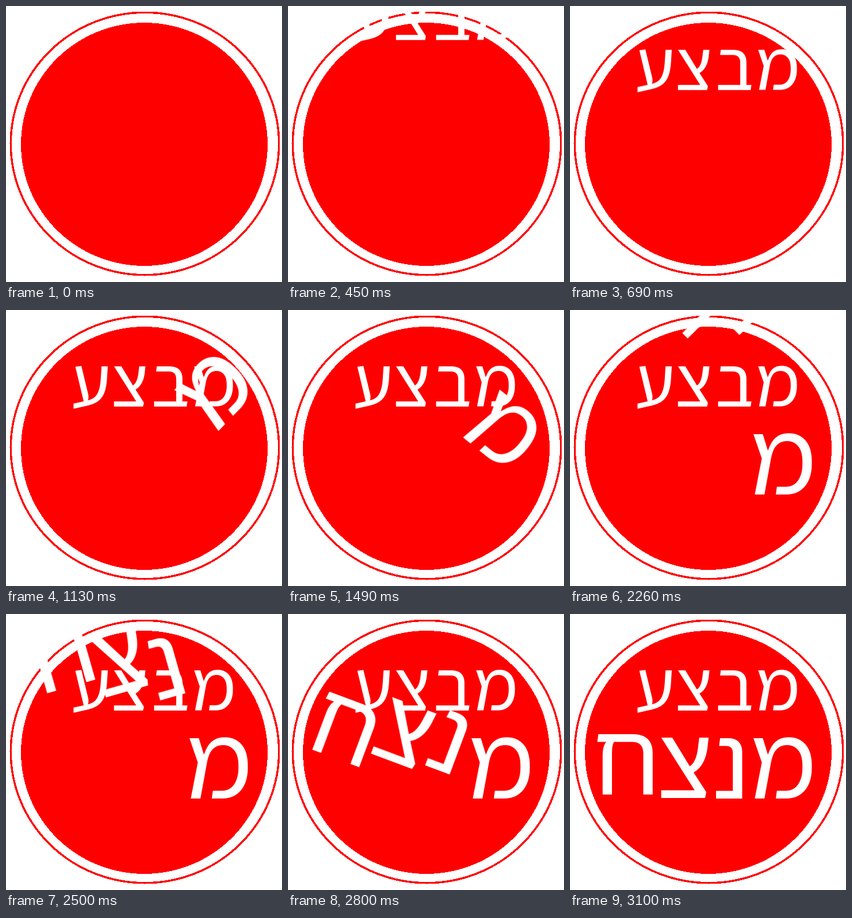
These frames come from a looping animation (480x480 px, 3.63 s). An HTML page:

```html
<!DOCTYPE html>
<html lang="he">
<head>
<meta charset="utf-8">
<title>מבצע מנצח</title>
<style>
  html, body { margin: 0; width: 100%; height: 100%; overflow: hidden; background: #fff; }
  svg { display: block; width: 100%; height: 100%; }
  text { fill: #fff; direction: ltr; }
  .slide { animation: slide 3630ms infinite; }
  .drop { animation: drop 3630ms infinite; }
  .tumble { animation: tumble 3630ms infinite; }

  @keyframes slide {
    0% { transform: translate(0, -174px); animation-timing-function: step-end; }
    9.0909% { transform: translate(0, -174px); animation-timing-function: steps(8, start); }
    22.314%, 100% { transform: translate(0, 0); }
  }
  @keyframes drop {
    0% { opacity: 0; transform: translate(-9px, -210px) rotate(-62deg); animation-timing-function: step-end; }
    27.8236% { opacity: 1; transform: translate(-9px, -210px) rotate(-62deg); animation-timing-function: steps(2); }
    31.1294% { opacity: 1; transform: translate(-5.5px, -129.5px) rotate(-46deg); animation-timing-function: steps(6); }
    41.0468% { opacity: 1; transform: translate(6px, -57.5px) rotate(38.7deg); animation-timing-function: steps(4); }
    47.6584%, 100% { opacity: 1; transform: translate(0, 0) rotate(0deg); }
  }
  @keyframes tumble {
    0% { opacity: 0; transform: translate(-4px, var(--high)) rotate(-45deg); animation-timing-function: step-end; }
    62.2589% { opacity: 1; transform: translate(-4px, var(--high)) rotate(-45deg); animation-timing-function: steps(9); }
    77.1349% { opacity: 1; transform: translate(2px, var(--low)) rotate(20.5deg); animation-timing-function: steps(5); }
    85.3994%, 100% { opacity: 1; transform: translate(0, 0) rotate(0deg); }
  }
</style>
</head>
<body>
<svg viewBox="0 0 480 480" role="img" aria-label="מבצע מנצח">
  <g shape-rendering="crispEdges">
    <ellipse cx="241.5" cy="239.5" rx="233.25" ry="228.25" fill="#fff" stroke="#f00" stroke-width="3.5"/>
    <ellipse cx="240.5" cy="240.5" rx="214.5" ry="211.5" fill="#f00"/>
  </g>
  <g id="top" class="slide"></g>
  <g id="bottom"></g>
</svg>
<script>
  // Each letter: left and right edge of its ink, baseline, motion
  const upper = [
    { ch: 'מ', l: 327, r: 395, base: 168 },
    { ch: 'ב', l: 253, r: 320, base: 168 },
    { ch: 'צ', l: 187, r: 243, base: 168 },
    { ch: 'ע', l: 115, r: 179, base: 168, tail: 6 }
  ];
  const lower = [
    { ch: 'מ', l: 320, r: 420, base: 321, move: 'drop' },
    { ch: 'נ', l: 250, r: 303, base: 321, move: 'tumble', high: -278, low: -47 },
    { ch: 'צ', l: 158, r: 241, base: 320, move: 'tumble', high: -284, low: -60 },
    { ch: 'ח', l: 48, r: 143, base: 314, move: 'tumble', high: -284, low: -61.5 }
  ];
  const upperHeight = 71, lowerHeight = 107;
  const families = ['Open Sans', 'Noto Sans Hebrew', 'Droid Sans Hebrew', 'Open Sans Hebrew',
    'Noto Sans', 'DejaVu Sans', 'Liberation Sans', 'Roboto', 'Lato', 'Inter'];
  const NS = 'http://www.w3.org/2000/svg';
  const ctx = document.createElement('canvas').getContext('2d');

  function ink(ch, family) {
    ctx.font = `200px "${family}", sans-serif`;
    ctx.textAlign = 'left';
    const m = ctx.measureText(ch);
    return {
      l: -m.actualBoundingBoxLeft / 200,
      r: m.actualBoundingBoxRight / 200,
      up: m.actualBoundingBoxAscent / 200,
      down: m.actualBoundingBoxDescent / 200
    };
  }

  const sizeFor = (height, family) => height / ink('מ', family).up;

  // How far a family's proportions are from the wanted lettering
  function misfit(family) {
    const score = (letters, height) => {
      const size = sizeFor(height, family);
      return letters.reduce((sum, d) => {
        const m = ink(d.ch, family);
        return sum + Math.abs((m.r - m.l) * size - (d.r - d.l)) + Math.abs(m.down * size - (d.tail || 0));
      }, 0);
    };
    return score(upper, upperHeight) + score(lower, lowerHeight);
  }

  const family = families.reduce((a, b) => misfit(b) < misfit(a) ? b : a);

  function add(parent, name, attrs) {
    const el = document.createElementNS(NS, name);
    for (const key in attrs) el.setAttribute(key, attrs[key]);
    return parent.appendChild(el);
  }

  function write(id, letters, height) {
    const size = sizeFor(height, family);
    const parent = document.getElementById(id);
    for (const d of letters) {
      const m = ink(d.ch, family);
      const place = add(parent, 'g', { transform: `translate(${(d.l + d.r) / 2} ${d.base - height / 2})` });
      const body = add(place, 'g', {
        class: d.move || '',
        style: d.high ? `--high:${d.high}px;--low:${d.low}px` : ''
      });
      add(body, 'text', {
        x: -(m.l + m.r) / 2 * size,
        y: height / 2,
        style: `font: ${size}px "${family}", sans-serif`
      }).textContent = d.ch;
    }
  }

  write('top', upper, upperHeight);
  write('bottom', lower, lowerHeight);
</script>
</body>
</html>
```
